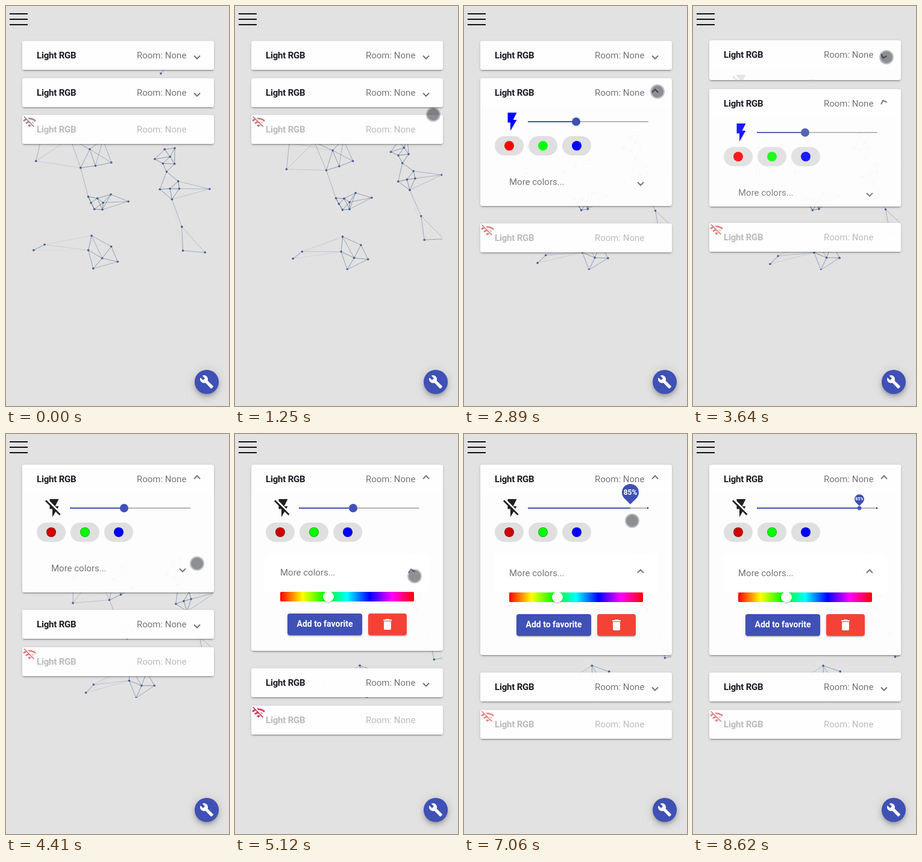
Animation of 370 by 664 pixels, one loop 8650 ms. Source, as an HTML page with a canvas:

```html
<!DOCTYPE html>
<html lang="en">
<head>
<meta charset="utf-8">
<title>Light controls</title>
<style>
html, body { margin: 0; width: 370px; height: 664px; overflow: hidden; background: #e2e2e2; }
body { position: relative; font: 15px/48px Roboto, Arial, sans-serif; color: #75757d; }
body * { position: absolute; box-sizing: border-box; }
svg * { position: static; }
canvas { left: 44px; top: 96px; }

/* All motion shares one clock and the material curve */
.card, .body, .more, .chev, .thumb, .knob, .bubble, .fill, .tick, .wifi, .inner, .pointer {
  animation: 8650ms cubic-bezier(.4, 0, .2, 1) infinite;
}
.card, .btn {
  box-shadow: 0 3px 1px -2px rgba(0, 0, 0, .2), 0 2px 2px rgba(0, 0, 0, .14), 0 1px 5px rgba(0, 0, 0, .12);
}

.menu { left: 6px; top: 12px; width: 30px; height: 20px; border: solid #111; border-width: 2px 0; }
.menu i { top: 7px; width: 30px; height: 2px; background: #111; }

.card {
  left: 27px; width: 318px; height: 48px; overflow: hidden; border-radius: 4px;
  background: rgba(255, 255, 255, .95);
}
.head { width: 318px; height: 48px; background: rgba(255, 255, 255, .5); white-space: nowrap; }
.head b { left: 24px; color: #1b1b26; letter-spacing: -.2px; }
.head span { left: 190px; }
.off b, .off span { color: #bbb; }
.chev { left: 282px; top: 16px; width: 16px; height: 16px; fill: none; stroke: #73737b; stroke-width: 2; }
#c1 { animation-name: card1; }
#c2 { animation-name: card2; }
#c3 { animation-name: card3; }
#c1 > .head .chev { animation-name: flip1; }
#c2 > .head .chev { animation-name: flip2; }
@keyframes card1 {
  0%, 41.62% { top: 58px; height: 48px; }
  44.22%, 57.42% { top: 51px; height: 212px; }
  60.02%, 100% { top: 51px; height: 316px; }
}
@keyframes card2 {
  0%, 22.77% { top: 120px; height: 48px; }
  25.38%, 41.62% { top: 120px; height: 212px; }
  44.22%, 57.42% { top: 292px; height: 48px; }
  60.02%, 100% { top: 396px; height: 48px; }
}
@keyframes card3 {
  0%, 22.77% { top: 181px; }
  25.38%, 41.62% { top: 361px; }
  44.22%, 57.42% { top: 354px; }
  60.02%, 100% { top: 458px; }
}
@keyframes flip1 { 0%, 41.62% { transform: none; } 44.22%, 100% { transform: rotate(180deg); } }
@keyframes flip2 { 0%, 22.77%, 44.22%, 100% { transform: none; } 25.38%, 41.62% { transform: rotate(180deg); } }

.body { top: 0; width: 318px; height: 316px; }
#c1 .body { animation-name: show1; }
#c2 .body { animation-name: show2; }
@keyframes show1 { 0%, 41.62% { opacity: 0; } 44.22%, 100% { opacity: 1; } }
@keyframes show2 { 0%, 22.77%, 44.22%, 100% { opacity: 0; } 25.38%, 41.62% { opacity: 1; } }
.bolt { left: 35px; top: 54px; width: 36px; height: 36px; }
.track { left: 79px; top: 71px; width: 200px; height: 2px; background: #b5b5b5; }
.fill { height: 2px; background: #3f51b5; }
.thumb { top: 1px; }
.knob { left: -7px; top: -7px; width: 14px; height: 14px; border-radius: 50%; background: #3f51b5; }
.bubble { left: -14px; top: -40px; width: 28px; height: 28px; transform-origin: 14px 40px; transform: scale(0); }
.bubble i { inset: 0; border-radius: 50% 50% 0; background: #3f51b5; transform: rotate(45deg); }
.bubble b { inset: 0; font-size: 12px; line-height: 28px; text-align: center; color: #fff; }
.tick { right: 0; width: 2px; height: 2px; background: #111; opacity: 0; }
#c1 .thumb { animation-name: slide; }
#c1 .fill { animation-name: grow; }
#c1 .knob { animation-name: tuck; }
#c1 .bubble { animation-name: pop; }
#c1 .tick { animation-name: mark; }
@keyframes slide { 0%, 73.4% { left: 90px; } 80.35%, 100% { left: 170px; } }
@keyframes grow { 0%, 73.4% { width: 90px; } 80.35%, 100% { width: 170px; } }
@keyframes pop { 0%, 70.87% { transform: scale(0); } 73.2%, 98.7% { transform: none; } 100% { transform: scale(.55); } }
@keyframes tuck { 0%, 70.87% { transform: none; } 73.2%, 98.7% { transform: scale(0); } 100% { transform: scale(.5); } }
@keyframes mark { 0%, 70.87% { opacity: 0; } 73.2%, 100% { opacity: 1; } }

.chip { top: 96px; width: 48px; height: 32px; border-radius: 16px; background: #dfdfdf; }
.chip i { left: 16px; top: 8px; width: 16px; height: 16px; border-radius: 50%; }
#c1 .chip i { border: 1px solid rgba(0, 0, 0, .28); }

.panel { left: 24px; top: 148px; width: 271px; }
.more { position: relative; height: 48px; border-radius: 4px; }
.more span { left: 24px; top: 50%; margin-top: -24px; }
.more .chev { left: 234px; top: 50%; margin-top: -8px; }
.inner { position: relative; height: 104px; opacity: 0; }
#c1 .more { animation-name: spread; }
#c1 .more .chev { animation-name: flip3; }
#c1 .inner { animation-name: reveal; }
@keyframes spread {
  0%, 57.42% { height: 48px; background: rgba(255, 255, 255, 0); }
  60.02%, 100% { height: 64px; background: rgba(255, 255, 255, .75); }
}
@keyframes flip3 { 0%, 57.42% { transform: none; } 60.02%, 100% { transform: rotate(180deg); } }
@keyframes reveal { 0%, 57.42% { opacity: 0; } 58.6%, 100% { opacity: 1; } }
.hue {
  left: 24px; top: 0; width: 222px; height: 16px; border-radius: 2px;
  background: linear-gradient(90deg, red, #ff0, #0f0, #0ff, #00f, #f0f, red);
}
.hue i {
  left: 71px; top: -1px; width: 18px; height: 18px; border-radius: 50%;
  background: #fff; box-shadow: 0 1px 2px rgba(0, 0, 0, .3);
}
.btn {
  top: 36px; height: 36px; border-radius: 4px; color: #fff;
  font-size: 14px; font-weight: 700; line-height: 35px; text-align: center;
}
.add { left: 36px; width: 124px; background: #3f51b5; }
.del { left: 170px; width: 64px; background: #f44336; }
.del svg { left: 20px; top: 6px; }

.wifi { left: 0; top: 0; animation-name: tint; }
@keyframes tint {
  0% { fill: #a58d8a; } 22%, 24% { fill: #c87c7a; } 33%, 56% { fill: #e08482; }
  59% { fill: #d63a5c; } 64%, 100% { fill: #e58a88; }
}

.fab {
  left: 313px; top: 604px; width: 40px; height: 40px; border-radius: 50%; background: #3f51b5;
  box-shadow: 0 3px 5px -1px rgba(0, 0, 0, .2), 0 6px 10px rgba(0, 0, 0, .14), 0 1px 18px rgba(0, 0, 0, .12);
}
.fab svg { left: 8px; top: 8px; }

.pointer {
  left: -12px; top: -12px; width: 24px; height: 24px; border-radius: 50%;
  background: #8e9094; border: 2px solid #c0c2ca; mix-blend-mode: multiply;
  animation-name: roam; animation-timing-function: ease-in-out;
}
@keyframes roam {
  0%, 5.78% { transform: translate(384px, 235px); }
  10.4% { transform: translate(334px, 200px); }
  19.65%, 22.77% { transform: translate(321px, 150px); }
  26.6%, 34.1% { transform: translate(321px, 142px); }
  40.2%, 42.8% { transform: translate(321px, 85px); }
  50.98% { transform: translate(317px, 215px); }
  54.9%, 60.7% { transform: translate(298px, 236px); }
  70.3%, 73.4% { transform: translate(197px, 127px); }
  80.35%, 82.1% { transform: translate(279px, 144px); animation-timing-function: ease-in; }
  91.8% { transform: translate(334px, 475px); animation-timing-function: linear; }
  98.8%, 100% { transform: translate(347px, 680px); }
}
</style>
</head>
<body>
<canvas width="300" height="342"></canvas>
<div class="menu"><i></i></div>
<div id="cards"></div>
<div class="fab"><svg width="24" height="24" fill="#fff"><path d="M22.7 19l-9.1-9.1c.9-2.3.4-5-1.5-6.9-2-2-5-2.4-7.4-1.3L9 6 6 9 1.6 4.7C.4 7.1.9 10.1 2.9 12.1c1.9 1.9 4.6 2.4 6.9 1.5l9.1 9.1c.4.4 1 .4 1.4 0l2.3-2.3c.5-.4.5-1.1.1-1.4z"/></svg></div>
<div class="pointer"></div>
<script>
const LOOP = 8650;
const BOLT_ON = 'M7 2v11h3v9l7-12h-4l4-8z';
const BOLT_OFF = 'M3.27 3L2 4.27l5 5V13h3v9l3.58-6.14L17.73 20 19 18.73 3.27 3zM17 10h-4l4-8H7v2.18l8.46 8.46L17 10z';
const BIN = 'M6 19c0 1.1.9 2 2 2h8c1.1 0 2-.9 2-2V7H6v12zM19 4h-3.5l-1-1h-5l-1 1H5v2h14V4z';
const WIFI_OFF = 'M22.99 9C19.15 5.16 13.8 3.76 8.84 4.78l2.52 2.52c3.47-.17 6.99 1.05 9.63 3.7l2-2zm-4 4c-1.29-1.29-2.84-2.13-4.49-2.56l3.53 3.53.96-.97zM2 3.05L5.07 6.1C3.6 6.82 2.22 7.78 1 9l1.99 2c1.24-1.24 2.67-2.16 4.2-2.77l2.24 2.24C7.81 10.89 6.27 11.73 5 13v.01L6.99 15c1.36-1.36 3.14-2.04 4.92-2.06L18.98 20l1.27-1.26L3.29 1.79 2 3.05zM9 17l3 3 3-3c-1.65-1.66-4.34-1.66-6 0z';

const icon = (d, cls, fill) => `<svg class="${cls}" width="24" height="24" viewBox="0 0 24 24" fill="${fill}"><path d="${d}"/></svg>`;
const chevron = '<svg class="chev" viewBox="0 0 16 16"><path d="M3 8.5l5 5 5-5"/></svg>';
const head = mark => `<div class="head"><b>Light RGB</b><span>Room: None</span>${mark}</div>`;
const chip = (color, i) => `<div class="chip" style="left:${24 + 56 * i}px"><i style="background:${color}"></i></div>`;
const body = (bolt, color, level, red) => `<div class="body">
  ${icon(bolt, 'bolt', color)}
  <div class="track"><i class="fill" style="width:${level * 2}px"></i><i class="tick"></i>
    <div class="thumb" style="left:${level * 2}px"><i class="knob"></i>
      <div class="bubble"><i></i><b>${level}%</b></div></div></div>
  ${[red, '#0f0', '#00f'].map(chip).join('')}
  <div class="panel"><div class="more"><span>More colors...</span>${chevron}</div>
    <div class="inner"><div class="hue"><i></i></div>
      <div class="btn add">Add to favorite</div>
      <div class="btn del">${icon(BIN, '', '#fff')}</div>
    </div></div></div>`;

document.getElementById('cards').innerHTML =
  `<div class="card" id="c1">${head(chevron)}${body(BOLT_OFF, '#212121', 45, '#cf0000')}</div>
   <div class="card" id="c2">${head(chevron)}${body(BOLT_ON, '#00f', 40, '#f00')}</div>
   <div class="card off" id="c3">${head('')}${icon(WIFI_OFF, 'wifi', '')}</div>`;

// Groups of dots: centre, radius, count
const groups = [
  { x: 56, y: 396, r: 16, n: 2 }, { x: 154, y: 410, r: 36, n: 6 }, { x: 300, y: 392, r: 38, n: 3 },
  { x: 146, y: 326, r: 16, n: 5 }, { x: 182, y: 322, r: 30, n: 3 }, { x: 270, y: 310, r: 20, n: 4 },
  { x: 266, y: 252, r: 24, n: 7 }, { x: 322, y: 290, r: 42, n: 2 }, { x: 150, y: 254, r: 36, n: 5 },
  { x: 266, y: 108, r: 20, n: 2 }, { x: 75, y: 225, r: 45, n: 3 }
];
const GOLDEN = 2.4;
const REACH = 95;
const LINKS = 3;

// Sunflower scatter inside each group
const dots = groups.flatMap(({ x, y, r, n }, g) => Array.from({ length: n }, (_, i) => {
  const a = g + i * GOLDEN, d = r * Math.sqrt((i + .5) / n);
  return { x: x + d * Math.cos(a), y: y + d * Math.sin(a) };
}));

const gap = (a, b) => Math.hypot(a.x - b.x, a.y - b.y);

// Each dot is tied to its nearest neighbours
const links = dots.flatMap((dot, i) => dots
  .map((other, j) => ({ i, j, d: gap(dot, other) }))
  .filter(link => link.j !== i)
  .sort((a, b) => a.d - b.d)
  .slice(0, LINKS))
  .filter(({ i, j }, k, all) => i < j || !all.some(l => l.i === j && l.j === i));

// A slow shear that settles with time
function flow({ x, y }, t) {
  const p = 1.2 * (1 - Math.exp(-t / 1300)) + t / 20000;
  return {
    x: x + p * (30 + .12 * (y - 300) - .15 * (x - 180)),
    y: y + p * (12 - .16 * (x - 80))
  };
}

const ctx = document.querySelector('canvas').getContext('2d');
ctx.translate(-44, -96);
ctx.lineWidth = .7;
ctx.fillStyle = '#4a5f90';

function drawNet(t) {
  const pts = dots.map(dot => flow(dot, t));
  ctx.clearRect(44, 96, 300, 342);
  for (const { i, j } of links) {
    const a = pts[i], b = pts[j];
    ctx.strokeStyle = `rgba(62,86,132,${Math.max(0, 1 - gap(a, b) / REACH)})`;
    ctx.beginPath();
    ctx.moveTo(a.x, a.y);
    ctx.lineTo(b.x, b.y);
    ctx.stroke();
  }
  for (const { x, y } of pts) {
    ctx.beginPath();
    ctx.arc(x, y, 1.8, 0, 7);
    ctx.fill();
  }
}

const thumb = document.querySelector('#c1 .thumb');
const label = thumb.querySelector('b');

function frame() {
  drawNet(performance.now() % LOOP);
  label.textContent = Math.round(thumb.offsetLeft / 2) + '%';
  requestAnimationFrame(frame);
}
frame();
</script>
</body>
</html>
```
